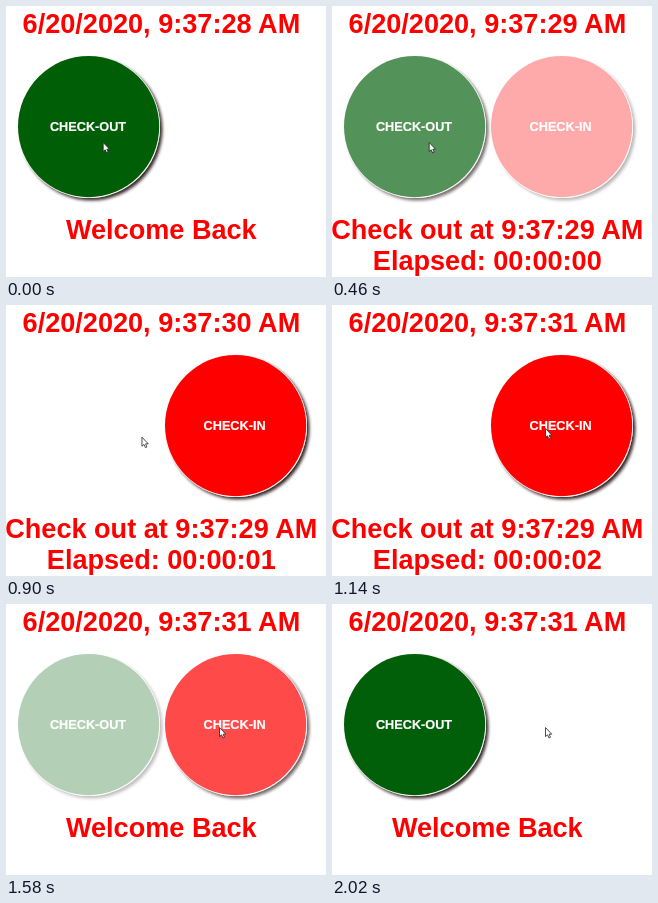
Animation, 320 px wide and 271 px high, one loop 2.14 s. Source, as an HTML page:

```html
<!DOCTYPE html>
<html lang="en">
<head>
<meta charset="utf-8">
<title>Check-in clock</title>
<style>
  html, body { margin: 0; width: 100%; height: 100%; overflow: hidden; background: #fff; }
  svg { display: block; width: 320px; height: 271px; }
  text { font: bold 27.1px "Liberation Sans", Arial, sans-serif; text-anchor: middle; fill: #f00; }
  .button text { font-size: 12.7px; fill: #fff; stroke: #fff; stroke-width: .2; }
  .rim { fill: #fff; filter: url(#shadow); }
</style>
</head>
<body>
<svg viewBox="0 0 320 271">
  <filter id="shadow" x="-10%" y="-10%" width="120%" height="120%">
    <feDropShadow dx="2.4" dy="2.4" stdDeviation="1.7" flood-color="#1c0808" flood-opacity=".9"/>
  </filter>
  <text id="clock" x="155.4" y="27"></text>
  <g id="checkOut" class="button">
    <circle class="rim" cx="83" cy="121" r="71"/>
    <circle cx="82.6" cy="120.6" r="70.6" fill="#005e07"/>
    <text x="82" y="125">CHECK-OUT</text>
  </g>
  <g id="checkIn" class="button">
    <circle class="rim" cx="230" cy="121" r="71"/>
    <circle cx="229.6" cy="120.6" r="70.6" fill="#f00"/>
    <text x="228.6" y="125">CHECK-IN</text>
  </g>
  <text id="message" x="155.3" y="233"></text>
  <text id="elapsed" x="155.3" y="264"></text>
  <path id="cursor" d="M.5 .5V9.6L2.5 7.8L4 11L5.5 10.3L4.1 7.2H6.8Z" fill="#fff" stroke="#222" stroke-width=".8"/>
</svg>
<script>
const LOOP = 2140;
const STEPS = [0, 120, 240, 340, 460, 560, 660, 780, 900, 1020, 1140,
               1360, 1480, 1580, 1700, 1800, 1920, 2020];
const $ = id => document.getElementById(id);
const progress = (t, start, length) => Math.min(1, Math.max(0, (t - start) / length));
const swing = p => 0.5 - Math.cos(Math.PI * p) / 2;

function show(button, opacity) {
  button.style.opacity = opacity;
  button.style.display = opacity < 0.015 ? "none" : "";
}

function draw(t) {
  const second = t < 120 ? 28 : t < 900 ? 29 : t < 1140 ? 30 : 31;
  const away = t >= 240 && t < 1360;
  $("clock").textContent = `6/20/2020, 9:37:${second} AM`;
  $("message").textContent = away ? "Check out at 9:37:29 AM" : "Welcome Back";
  $("elapsed").textContent = away ? `Elapsed: 00:00:0${second - 29}` : "";

  const out = swing(progress(t, 180, 720)) - swing(progress(t, 1300, 770));
  show($("checkOut"), 1 - out);
  show($("checkIn"), out);

  const move = progress(t, 780, 360);
  $("cursor").setAttribute("transform", `translate(${96.7 + 116.3 * move} ${136 - 13 * move})`);
}

function tick() {
  const now = performance.now() % LOOP;
  draw(STEPS.findLast(s => s <= now));
  requestAnimationFrame(tick);
}
tick();
</script>
</body>
</html>
```
